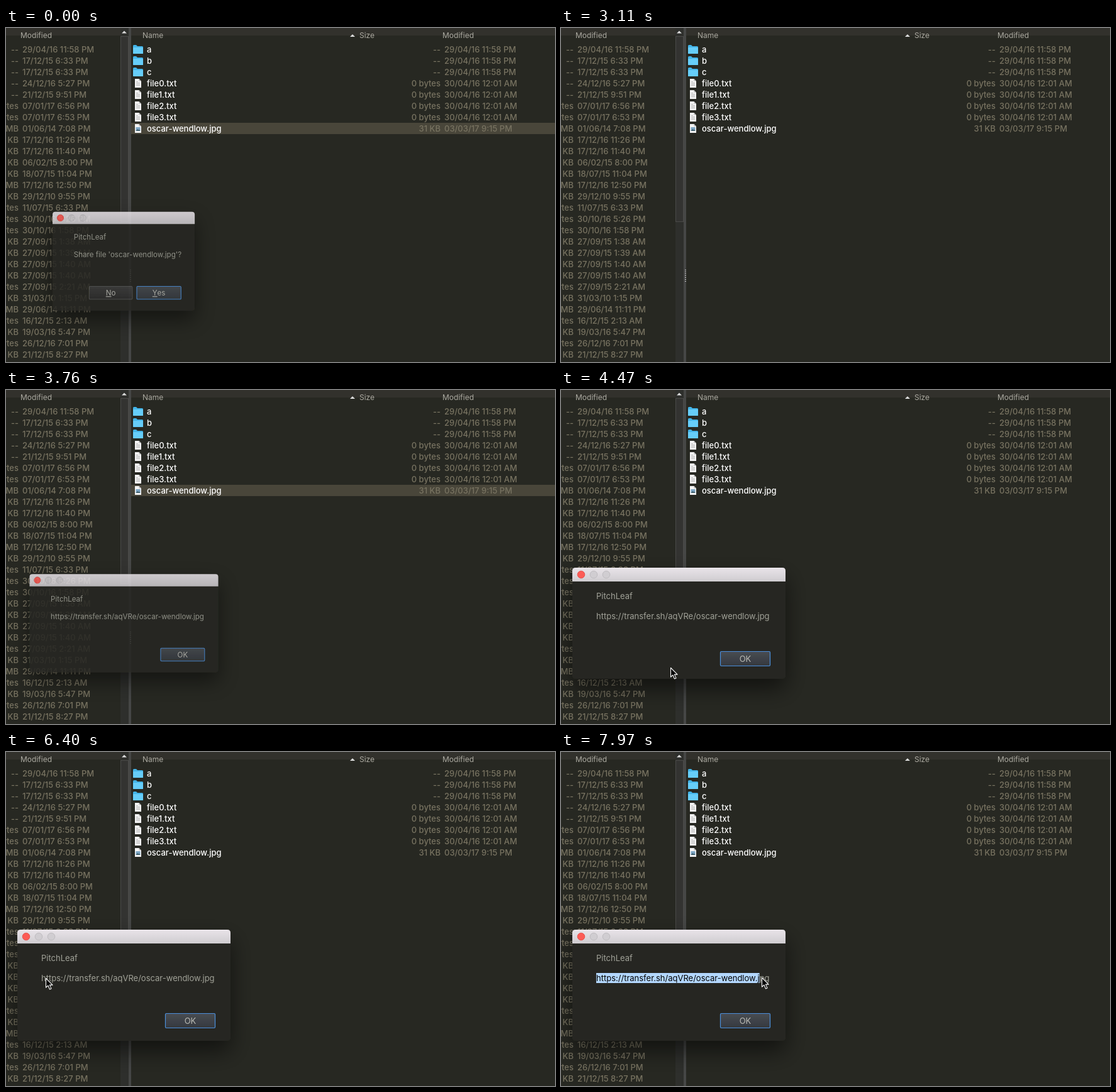
Animation of 873 by 532 pixels, one loop 8 s. Source, as an HTML page:

```html
<!DOCTYPE html>
<html lang="en">
<head>
<meta charset="utf-8">
<title>File sharing dialog</title>
<style>
  html, body { margin: 0; width: 100%; height: 100%; overflow: hidden; background: #272822; }
  svg { display: block; width: 100vw; height: 100vh; }
  text { font: 500 13px Inter, "Open Sans", sans-serif; white-space: pre; fill: #787361; }
  .head { font-size: 12px; font-weight: 400; fill: #aba9a0; }
  .name { fill: #fff; }
  .msg { font-weight: 400; fill: #a0a098; }
  .button { font-weight: 400; fill: #bcbcb5; text-anchor: middle; }
  .end { text-anchor: end; }
  .mnemonic { text-decoration: underline; }
  #picked { font-weight: 400; fill: #000; }
</style>
</head>
<body>
<svg viewBox="0 0 873 532">
  <defs>
    <linearGradient id="bar" x2="0" y2="1">
      <stop stop-color="#e9e4e9"/><stop offset="1" stop-color="#cfccd0"/>
    </linearGradient>
    <linearGradient id="plain" x2="0" y2="1">
      <stop stop-color="#3d3d3d"/><stop offset="1" stop-color="#2c2c2c"/>
    </linearGradient>
    <linearGradient id="focus" x2="0" y2="1">
      <stop stop-color="#484c52"/><stop offset="1" stop-color="#35393f"/>
    </linearGradient>
    <filter id="shadow" x="-30%" y="-40%" width="160%" height="190%">
      <feDropShadow dx="0" dy="16" stdDeviation="18" flood-color="#000" flood-opacity=".55"/>
    </filter>
    <g id="folder">
      <path d="M0 1.5Q0 0 1.5 0H5l2 2h7.500q1.500 0 1.500 1.500V14H0z" fill="#43b4e8"/>
      <path d="M0 4h16v9q0 1-1 1H1q-1 0-1-1z" fill="#66cdf9"/>
    </g>
    <g id="page">
      <path d="M0 0h6.500l3.500 3.500V14H0z" fill="#f4f4f4"/>
      <path d="M6.500 0v3.500h3.500z" fill="#b5b5b5"/>
    </g>
    <path id="lines" d="M2 4.500h3M2 6.500h6M2 8.500h6M2 10.500h6" stroke="#aaa" stroke-width=".8"/>
    <g id="photo">
      <rect x="1.500" y="5" width="7" height="6" fill="#7ea7c6"/>
      <path d="M1.500 11l2.500-3 2 1.500 1-1 1.500 2.500z" fill="#3f5f6c"/>
    </g>
  </defs>
  <g id="browser"></g>
  <g id="dialogs"></g>
  <path id="cursor" d="M.5.5v14.700l3.400-3.200 2.600 6 2.500-1.100-2.600-5.800h4.700z"
    fill="#000" stroke="#fff" stroke-width="1.100" stroke-linejoin="round"/>
</svg>
<script>
const LOOP = 8000;
const FILE = "oscar-wendlow.jpg";
const URL_TEXT = "https://transfer.sh/aqVRe/" + FILE;
const $ = id => document.getElementById(id);
const label = (x, y, cls, s) => `<text x="${x}" y="${y}" class="${cls}">${s}</text>`;
const box = (x, y, w, h, fill, more = "") =>
  `<rect x="${x}" y="${y}" width="${w}" height="${h}" fill="${fill}" ${more}/>`;
const baseline = row => 38.5 + row * 18;

const leftRows = `--|29/04/16 11:58 PM
--|17/12/15 6:33 PM
--|17/12/15 6:33 PM
--|24/12/16 5:27 PM
--|21/12/15 9:51 PM
bytes|07/01/17 6:56 PM
bytes|07/01/17 6:53 PM
MB|01/06/14 7:08 PM
KB|17/12/16 11:26 PM
KB|17/12/16 11:40 PM
KB|06/02/15 8:00 PM
KB|18/07/15 11:04 PM
MB|17/12/16 12:50 PM
KB|29/12/10 9:55 PM
bytes|11/07/15 6:33 PM
bytes|30/10/16 5:26 PM
bytes|30/10/16 1:58 PM
KB|27/09/15 1:38 AM
KB|27/09/15 1:39 AM
KB|27/09/15 1:40 AM
KB|27/09/15 1:40 AM
bytes|27/09/15 2:21 AM
KB|31/03/10 1:15 PM
MB|29/06/14 11:11 PM
bytes|16/12/15 2:13 AM
KB|19/03/16 5:47 PM
bytes|26/12/16 7:01 PM
KB|21/12/15 8:27 PM`.split("\n").map(line => line.split("|"));

const rightRows = [
  ...["a", "b", "c"].map(n => [n, "--", "29/04/16 11:58 PM", "folder"]),
  ...[0, 1, 2, 3].map(i => [`file${i}.txt`, "0 bytes", "30/04/16 12:01 AM", "lines"]),
  [FILE, "31 KB", "03/03/17 9:15 PM", "photo"]
];

function icon(kind, row) {
  const y = 27 + row * 18;
  return kind === "folder"
    ? `<use href="#folder" x="202" y="${y}"/>`
    : `<use href="#page" x="205" y="${y}"/><use href="#${kind}" x="205" y="${y}"/>`;
}

$("browser").innerHTML =
  box(0, 0, 873, 532, "#272822") +
  box(0, 0, 873, 12, "#32312c") +
  box(182, 0, 13, 532, "#2e2f2c") +
  box(182.5, 13.5, 12, 295, "#333331", 'stroke="#4a4a48"') +
  box(195, 0, 4, 532, "#464746") +
  '<path d="M198 385v19" stroke="#ccc" stroke-width="2" stroke-dasharray="1 2"/>' +
  '<path d="M184 8.500l4-4 4 4zM547 14l4-4 4 4z" fill="#ddd"/>' +
  [[23, "Modified"], [217, "Name"], [562, "Size"], [694, "Modified"]]
    .map(([x, s]) => label(x, 15.5, "head", s)).join("") +
  box(199, 151, 674, 18, "#49463a", 'id="highlight"') +
  leftRows.map(([size, date], i) =>
    label(20, baseline(i), "end", size) + label(26, baseline(i), "", date)).join("") +
  rightRows.map(([name, size, date, kind], i) => icon(kind, i) +
    label(224, baseline(i), "name", name) +
    label(691, baseline(i), "end", size) +
    label(697, baseline(i), "", date)).join("");

function button(x, w, text, focused) {
  const [fill, stroke] = focused ? ["url(#focus)", "#4b8fdc"] : ["url(#plain)", "#555"];
  return box(x + .5, 416.5, w - 1, 23, fill, `rx="1.500" stroke="${stroke}" stroke-width="1.200"`) +
    label(x + w / 2, 433, "button", text);
}

function dialog(id, x, w, content) {
  const light = (i, fill, stroke) =>
    `<circle cx="${x + 14 + i * 20}" cy="294" r="5.800" fill="${fill}" stroke="${stroke}" stroke-width=".8"/>`;
  return `<g id="${id}" filter="url(#shadow)">` +
    box(x, 283, w, 177, "#272822", 'rx="5"') +
    `<path d="M${x} 305v-17q0-5 5-5h${w - 10}q5 0 5 5v17z" fill="url(#bar)"/>` +
    light(0, "#fc5b57", "#e2463f") + light(1, "#d0cdd1", "#b9b6ba") + light(2, "#d0cdd1", "#b9b6ba") +
    label(x + 38, 332.5, "msg", "PitchLeaf") + content + "</g>";
}

const key = s => `<tspan class="mnemonic">${s[0]}</tspan>${s.slice(1)}`;
$("dialogs").innerHTML =
  dialog("ask", 60, 254,
    label(98, 364.5, "msg", `Share file '${FILE}'?`) +
    button(125, 78, key("No"), false) + button(210, 80, key("Yes"), true)) +
  dialog("result", 18, 339,
    `<text id="link" x="56" y="364.500" class="msg">${URL_TEXT}</text>` +
    box(56, 352, 0, 16, "#b3d7ff", 'id="selection"') +
    '<text id="picked" x="56" y="364.500"></text>' +
    button(253, 80, "OK", true));

// Each entry: start time, scale, opacity
const askPoses = [[0, .89, .86], [50, 1, 1], [3110, 1, 0]];
const resultPoses = [[0, 1, 0], [3620, .7, .25], [3690, .8, .6], [3760, .885, .86], [3820, 1, 1]];

// Each entry: time, x, y, number of steps towards the next entry (0 holds)
const cursorPath = [
  [4170, 235, 494, 0], [4230, 176, 442, 0],
  [4470, 174, 442, 13], [5260, 57, 360, 0],
  [6400, 63, 360, 7], [6800, 145, 361, 0],
  [7040, 150, 360, 13], [7800, 321, 359, 0],
  [7860, 320, 359, 0], [7970, 319, 359, 0]
];

const latest = (list, t) => list.findLastIndex(entry => entry[0] <= t);
const ease = p => p * p * (3 - 2 * p);

function pose(id, list, t) {
  const [, scale, alpha] = list[latest(list, t)];
  $(id).setAttribute("transform",
    `translate(187.5 371.5) scale(${scale}) translate(-187.5 -371.5)`);
  $(id).setAttribute("opacity", alpha);
}

function cursorAt(t) {
  const i = latest(cursorPath, t);
  if (i < 0) return null;
  const [start, x, y, steps] = cursorPath[i];
  if (!steps) return [x, y];
  const [end, nextX, nextY] = cursorPath[i + 1];
  const p = ease(Math.floor((t - start) / (end - start) * steps) / steps);
  return [x + (nextX - x) * p, y + (nextY - y) * p];
}

function select(tipX) {
  let count = 0;
  while (count < URL_TEXT.length &&
    56 + $("link").getSubStringLength(0, count + 1) <= tipX - 1.5) count++;
  $("picked").textContent = URL_TEXT.slice(0, count);
  $("selection").setAttribute("width", count ? $("link").getSubStringLength(0, count) : 0);
}

function draw(now) {
  const t = now % LOOP;
  pose("ask", askPoses, t);
  pose("result", resultPoses, t);
  const highlighted = t < 50 || (t >= 3320 && t < 3820);
  $("highlight").setAttribute("opacity", highlighted ? 1 : 0);
  const tip = cursorAt(t);
  $("cursor").setAttribute("opacity", tip ? 1 : 0);
  if (tip) $("cursor").setAttribute("transform", `translate(${tip.map(Math.round)})`);
  select(tip && t >= 6450 ? tip[0] : 0);
}

const began = performance.now();
function tick() {
  draw(performance.now() - began);
  requestAnimationFrame(tick);
}
tick();
</script>
</body>
</html>
```
